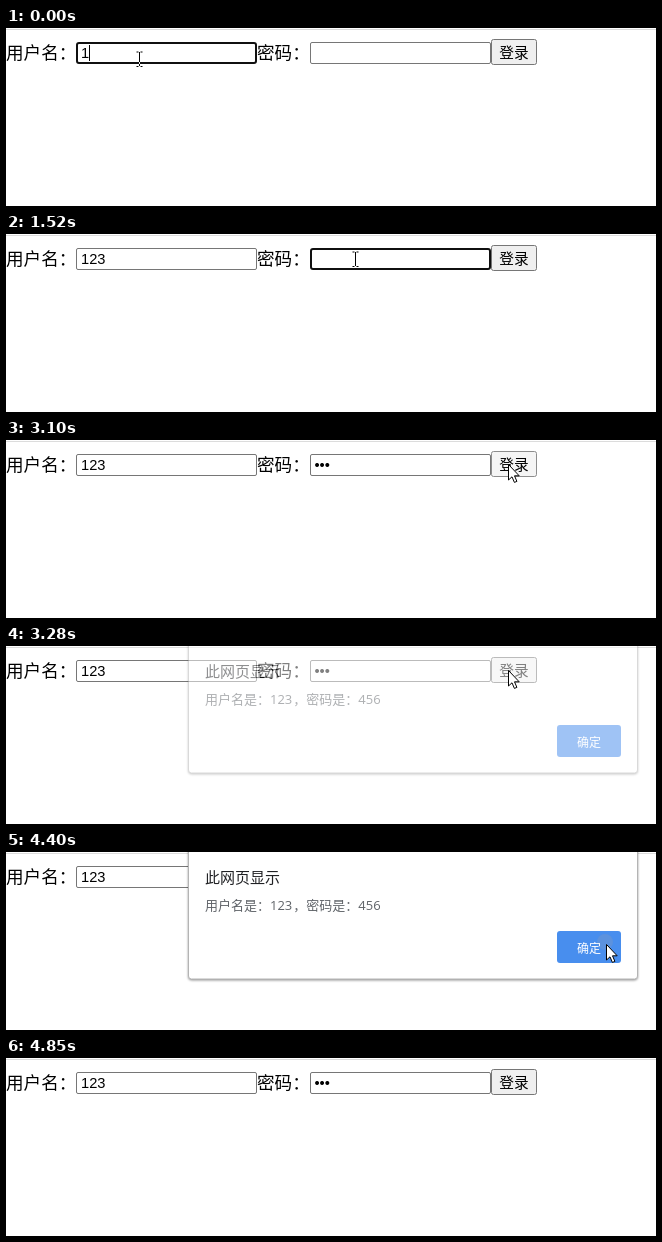
Write an HTML page that moves like this. It is 650 px wide and 178 px high and loops after 5440 ms.

```html
<!DOCTYPE html>
<html lang="zh-CN">
<head>
<meta charset="utf-8">
<title>登录</title>
<style>
html, body { margin: 0; width: 100%; height: 100%; overflow: hidden; background: #fff; }
svg { display: block; width: 650px; height: 178px; }
text { font-family: "Noto Sans CJK SC", "Noto Sans CJK", sans-serif; white-space: pre; }
.label { font-size: 17.6px; }
.field { font: 14.667px "Liberation Sans", Arial, sans-serif; }
.latin { font-family: "Open Sans", "Noto Sans", sans-serif; }
#beam { mix-blend-mode: difference; }
#dialog rect.panel { filter: drop-shadow(0 1px 1.2px rgba(0, 0, 0, .4)); }
</style>
</head>
<body>
<svg viewBox="0 0 650 178">
  <rect width="650" height="178" fill="#fff"/>
  <rect y="1" width="650" height="1" fill="#dcdcdc"/>
  <text class="label" x="0" y="30.5">用户名：</text>
  <text class="label" x="251" y="30.5">密码：</text>
  <rect id="userBox"/>
  <rect id="passBox"/>
  <text id="user" class="field" x="75" y="30"></text>
  <text id="pass" class="field" x="308.4" y="30"></text>
  <rect id="caret" y="17" width="1" height="16"/>
  <rect id="login" x="485.5" y="11.5" width="45" height="25" rx="2"/>
  <text x="493.3" y="30" font-size="14.667">登录</text>
  <g id="dialog">
    <rect class="panel" x="182.5" y="-10" width="449" height="137" rx="3" fill="#fff" stroke="#b4b4b4"/>
    <text x="199" y="30.7" font-size="15" fill="#202124">此网页显示</text>
    <text y="57.8" font-size="13" fill="#5f6368"><tspan x="199">用户名是：</tspan><tspan class="latin" x="264">123</tspan><tspan x="287.3">，密码是：</tspan><tspan class="latin" x="352.3">456</tspan></text>
    <rect id="ok" x="551" y="79" width="64" height="32" rx="3"/>
    <circle id="ripple" cx="599" cy="90" fill="#8a9bb8" opacity=".3"/>
    <text x="571" y="100.5" font-size="12" fill="#fff">确定</text>
  </g>
  <path id="beam" fill="none" stroke="#fff" d="M-2.5-7H-.5M1.5-7H3.5M.5-7V7M-2.5 7.5H-.5M1.5 7.5H3.5"/>
  <path id="arrow" fill="#fff" stroke="#000" stroke-linejoin="round" d="M.5.5V16L4 12.8 6.4 18.4 8.9 17.4 6.5 11.8H11.2Z"/>
</svg>
<script>
const LOOP = 5440;
const $ = id => document.getElementById(id);
const set = (id, attrs) => {
  for (const k in attrs) $(id).setAttribute(k, attrs[k]);
};
const show = (id, on) => set(id, { visibility: on ? "visible" : "hidden" });

// Pointer samples: time, x, y
const pointer = [
  [0, 133, 31], [630, 225, 32], [690, 326, 32], [780, 346, 28], [870, 349, 25],
  [2410, 388, 26], [2500, 462, 27], [2560, 498, 24], [2740, 500, 24], [2920, 502, 24],
  [3960, 531, 30], [4050, 545, 46], [4140, 566, 69], [4230, 586, 84], [4320, 598, 91],
  [4400, 600, 92], [4590, 606, 112], [4680, 616, 150], [4770, 620, 190]
];
const userKeys = [0, 180, 450];
const passKeys = [1770, 1950, 2320];
const FOCUS = 960, CLICK = 3100, OPEN = 3280, CONFIRM = 4400, CLOSE = 4590;

const typed = (keys, t) => keys.filter(k => t >= k).length;
const within = (t, a, b) => t >= a && t < b;

function box(id, x, focused, hovered) {
  const inset = focused ? 1 : .5;
  set(id, {
    x: x + inset, y: 14 + inset,
    width: 181 - 2 * inset, height: 22 - 2 * inset,
    rx: focused ? 2 : 1.5, fill: "#fff",
    stroke: focused ? "#101010" : hovered ? "#4f4f4f" : "#767676",
    "stroke-width": 2 * inset
  });
}

function drawForm(t) {
  const inPass = within(t, FOCUS, CLICK);
  const n = typed(userKeys, t), m = typed(passKeys, t);
  box("userBox", 70, t < FOCUS, false);
  box("passBox", 304, inPass, within(t, 690, FOCUS));
  $("user").textContent = "123".slice(0, n);
  $("pass").textContent = "•".repeat(m);
  set("caret", { x: Math.floor(t < FOCUS ? 75 + 8.16 * n : 308.4 + 5.13 * m) });
  show("caret", t < CLICK && !within(t, 1520, 1770) && !within(t, 2830, CLICK));

  const pressed = within(t, CLICK, OPEN), over = within(t, 2560, CLICK);
  set("login", {
    fill: pressed ? "#f5f5f5" : over ? "#e5e5e5" : "#efefef",
    stroke: pressed ? "#8d8d8d" : over ? "#4f4f4f" : "#767676"
  });
}

function drawDialog(t) {
  const open = within(t, OPEN, CLOSE + 90);
  const fading = t < OPEN + 90 || t >= CLOSE;
  show("dialog", open);
  set("dialog", { opacity: fading ? .5 : 1 });
  set("ok", { fill: t >= 4230 ? "#488eee" : "#4289ed" });
  set("ripple", { r: t < CONFIRM ? 0 : t < 4500 ? 8 : 14 });
}

function drawPointer(t) {
  const [, x, y] = pointer.filter(p => t >= p[0]).pop();
  const isBeam = t < 2560;
  show("beam", isBeam);
  show("arrow", !isBeam && t < 4770);
  set(isBeam ? "beam" : "arrow", { transform: `translate(${x} ${y})` });
}

function draw(t) {
  drawForm(t);
  drawDialog(t);
  drawPointer(t);
}

const start = performance.now();
function tick() {
  draw((performance.now() - start) % LOOP);
  requestAnimationFrame(tick);
}
tick();
</script>
</body>
</html>
```
